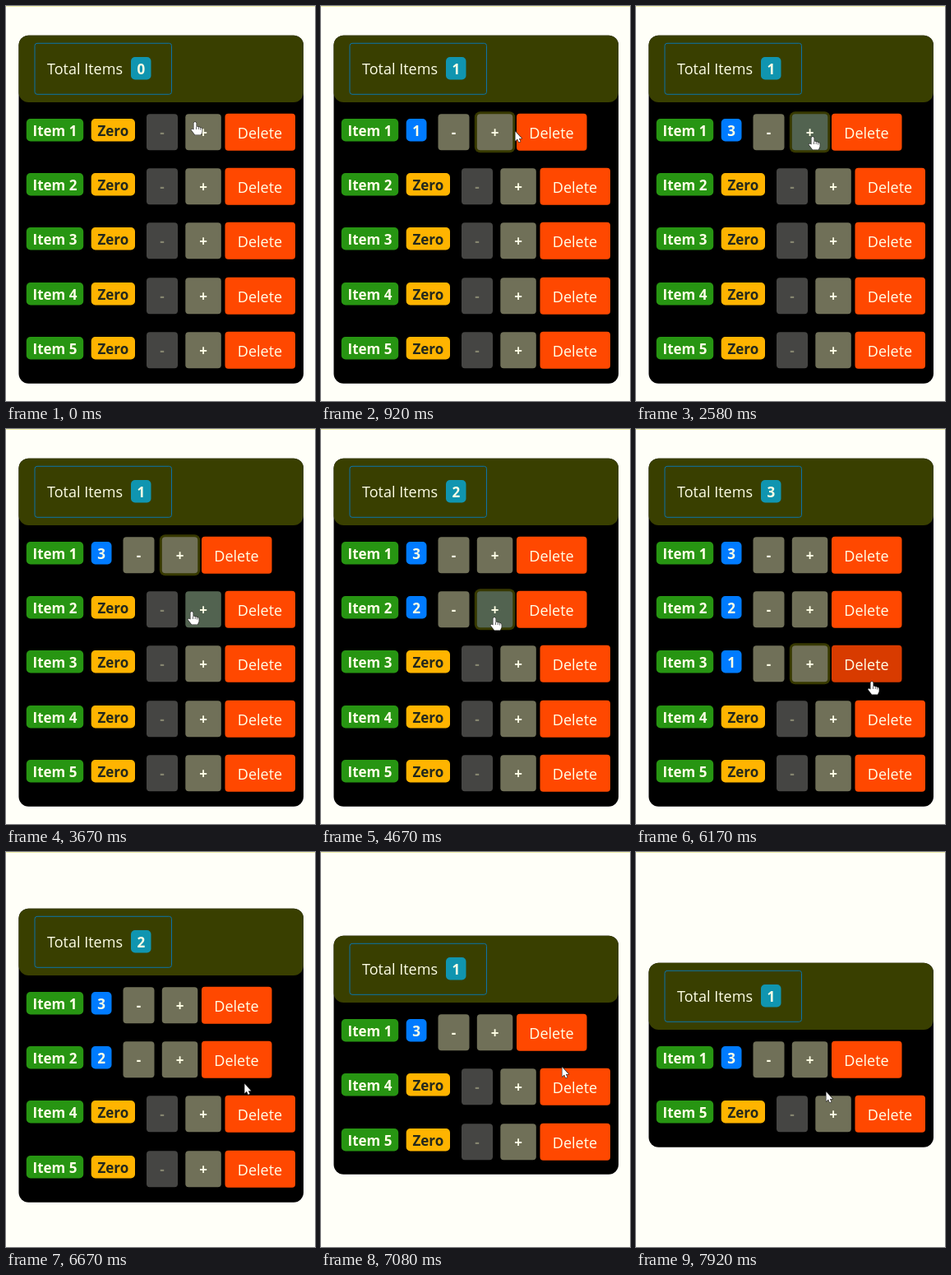
Write an HTML page with a canvas that moves like this. It is 376 px wide and 480 px high and loops after 8 s.

```html
<!DOCTYPE html>
<html lang="en">
<head>
<meta charset="utf-8">
<title>Item counter</title>
<style>
  html, body { margin: 0; width: 100%; height: 100%; overflow: hidden; background: #fffff8; }
  canvas { display: block; }
</style>
</head>
<body>
<canvas id="stage" width="376" height="480"></canvas>
<script>
const ctx = document.getElementById('stage').getContext('2d');
const LOOP = 8000;
const ROW_PITCH = 66.25;
const REGULAR = '18px "Open Sans", "Noto Sans", sans-serif';
const BOLD = 'bold 17px "Open Sans", "Noto Sans", sans-serif';
const CREAM = '#ffffe6';

// Each click: time, item, action
const clicks = [
  [500, 1, 'add'], [1500, 1, 'add'], [2100, 1, 'add'],
  [3850, 2, 'add'], [4500, 2, 'add'], [5550, 3, 'add'],
  [6430, 3, 'delete'], [6980, 2, 'delete'], [7640, 4, 'delete']
];

// Pointer stops: time, x, y
const stops = [
  [0, 230, 141], [250, 230, 147], [600, 230, 147], [920, 236, 152],
  [1350, 215, 159], [2700, 215, 159], [3500, 226, 222], [3900, 226, 222],
  [4300, 211, 229], [4700, 211, 229], [5300, 226, 290], [5650, 226, 290],
  [6170, 287, 307], [6350, 287, 300], [6500, 287, 300], [6850, 293, 261],
  [7100, 293, 261], [7400, 288, 280], [7660, 288, 280], [7920, 231, 291], [8000, 231, 291]
];

const arrow = new Path2D('M0.5 0.5V12L3 9.6L4.8 13.5L6.6 12.7L4.9 9H8.2Z');
const hand = new Path2D('M-1.5 1Q0 -1 1.5 1V6Q3 4.8 4.2 6.4Q5.8 5.6 6.6 7.2Q8.4 6.6 8.6 9V12L7 15.5H0L-4.6 9.5Q-4.4 7.4 -1.5 9.6Z');

function pointerAt(t) {
  const next = Math.max(1, stops.findIndex(stop => stop[0] > t));
  const [t0, x0, y0] = stops[next - 1];
  const [t1, x1, y1] = stops[next];
  const u = (t - t0) / (t1 - t0);
  const eased = u * u * (3 - 2 * u);
  return { x: x0 + (x1 - x0) * eased, y: y0 + (y1 - y0) * eased };
}

function stateAt(t) {
  let items = [1, 2, 3, 4, 5].map(id => ({ id, count: 0 }));
  let focus = 0;
  for (const [time, id, action] of clicks) {
    if (t < time) break;
    if (action === 'add') {
      items.find(item => item.id === id).count++;
      focus = id;
    } else {
      items = items.filter(item => item.id !== id);
      focus = 0;
    }
  }
  return { items, focus };
}

function box(x, y, w, h, r, fill, stroke) {
  ctx.beginPath();
  ctx.roundRect(x, y, w, h, r);
  if (fill) { ctx.fillStyle = fill; ctx.fill(); }
  if (stroke) { ctx.strokeStyle = stroke; ctx.lineWidth = 1; ctx.stroke(); }
}

function label(text, x, y, font, color, align = 'center') {
  ctx.font = font;
  ctx.fillStyle = color;
  ctx.textAlign = align;
  ctx.fillText(text, x, y);
}

function badge(text, x, y, w, fill, color = CREAM) {
  box(x, y, w, 27.5, 5, fill);
  label(text, x + w / 2, y + 20.5, BOLD, color);
}

function drawPointer({ x, y }, shape) {
  ctx.save();
  ctx.translate(x, y);
  ctx.fillStyle = '#fff';
  ctx.strokeStyle = '#222';
  ctx.lineWidth = 1.2;
  ctx.lineJoin = 'round';
  ctx.stroke(shape);
  ctx.fill(shape);
  if (shape === hand) {
    ctx.lineWidth = 0.7;
    ctx.stroke(new Path2D('M1.5 6V9M4.2 6.4V9M6.6 7.2V9.5'));
  }
  ctx.restore();
}

function draw(t) {
  const { items, focus } = stateAt(t);
  const pointer = pointerAt(t);
  let overButton = false;

  function hovers(x, y, w, h) {
    const inside = pointer.x >= x && pointer.x < x + w && pointer.y >= y && pointer.y < y + h;
    overButton ||= inside;
    return inside && t > 80;
  }

  ctx.fillStyle = '#fffff8';
  ctx.fillRect(0, 0, 376, 480);
  ctx.fillStyle = '#eeeeaa';
  ctx.fillRect(0, 0, 376, 1);

  const height = 91.5 + ROW_PITCH * items.length;
  const panelTop = 247 - height / 2;
  const top = Math.round(panelTop);
  box(15.5, top - 0.3, 346.5, Math.round(height), 12, '#000');
  box(15.5, top - 0.3, 346.5, 81.3, 12, '#393f00');
  box(35, top + 9.3, 166.5, 62, 3, null, '#0c73a8');
  label('Total Items', 50, top + 47, REGULAR, CREAM, 'left');
  badge(items.filter(item => item.count).length, 152, top + 26, 24.5, '#1095b0');

  items.forEach(({ id, count }, i) => {
    const y = Math.round(panelTop + 95.2 + ROW_PITCH * i);
    const shift = count ? -28.5 : 0;
    badge('Item ' + id, 24.8, y + 6, 69.4, '#279512');
    if (count) badge(count, 103.7, y + 6, 24.8, '#007bff');
    else badge('Zero', 103.7, y + 6, 53.3, '#ffb400', '#24281c');

    const minusX = 171 + shift;
    const minusHover = count && hovers(minusX, y + 0.3, 38, 44);
    box(minusX, y + 0.3, 38, 44, 4, minusHover ? '#526350' : count ? '#707058' : '#454543');
    label('-', minusX + 19, y + 29, BOLD, count ? CREAM : '#85856f');

    const plusX = 218.3 + shift;
    if (focus === id) box(plusX - 3, y - 2.7, 49.5, 50, 7, '#373900');
    box(plusX, y + 0.3, 43.5, 44, 4, hovers(plusX, y + 0.3, 43.5, 44) ? '#526350' : '#707058');
    label('+', plusX + 21.75, y + 29, BOLD, CREAM);

    const deleteX = 266.5 + shift;
    box(deleteX, y - 0.3, 85.5, 45, 4, hovers(deleteX, y, 85.5, 44.5) ? '#d83b00' : '#ff4800');
    label('Delete', deleteX + 42.5, y + 30, REGULAR, CREAM);
  });

  drawPointer(pointer, overButton ? hand : arrow);
}

const start = performance.now();
function tick() {
  draw((performance.now() - start) % LOOP);
  requestAnimationFrame(tick);
}
tick();
</script>
</body>
</html>
```
